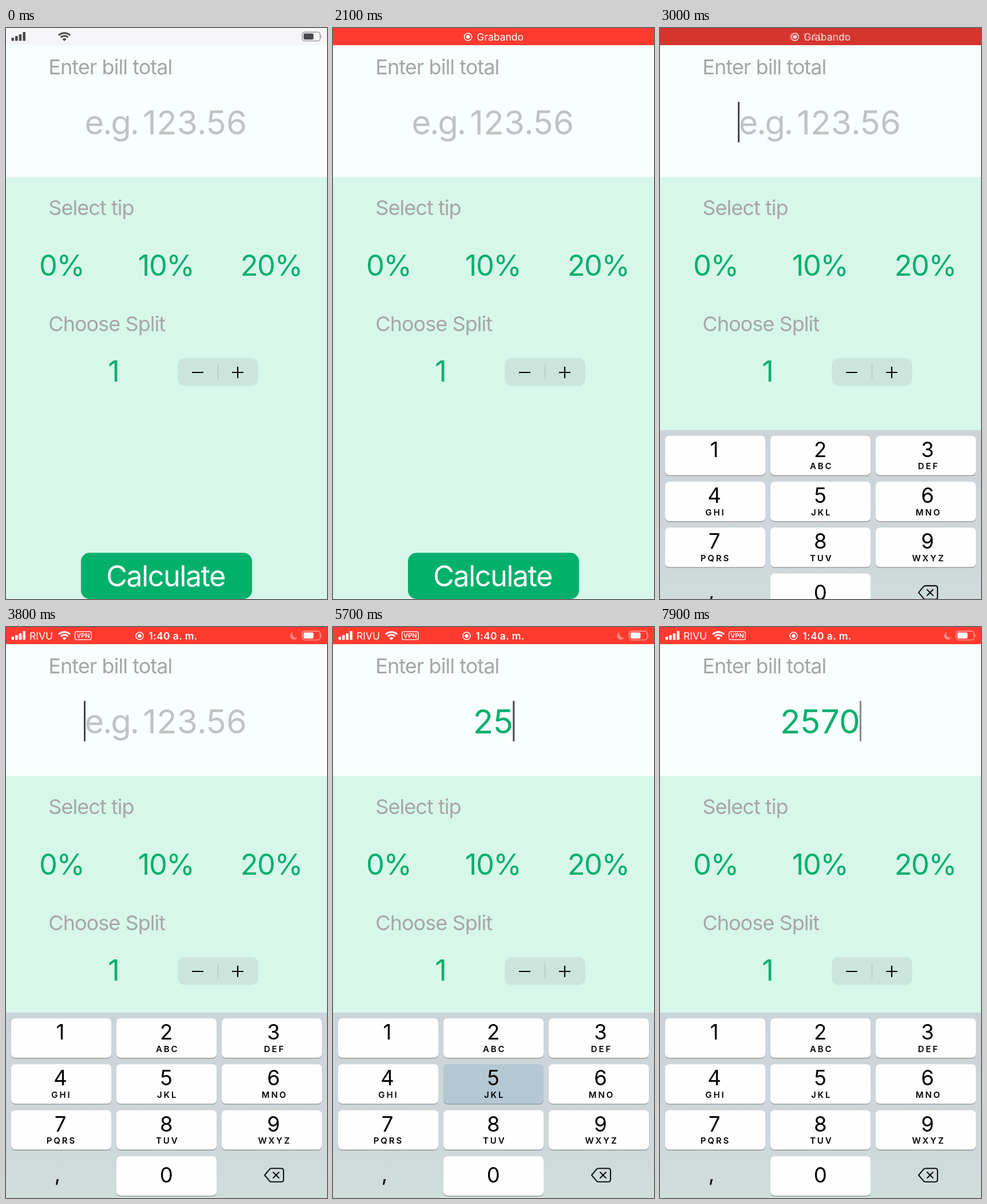
Animation of 561x998 px, one loop 8000 ms. Source, as an HTML page:

```html
<!DOCTYPE html>
<html lang="en">
<head>
<meta charset="utf-8">
<title>Tip calculator</title>
<style>
  html, body { margin: 0; width: 100%; height: 100%; overflow: hidden; }
  svg { display: block; width: 561px; height: 998px; }
  text { font-family: Inter, Roboto, sans-serif; font-optical-sizing: none; }
  .mid, .tip, .key, .sub { text-anchor: middle; }
  .label { font-size: 36px; letter-spacing: -.95px; fill: #a6a6a6; }
  .tip { font-size: 50.5px; letter-spacing: -1.5px; fill: #00b06b; }
  .bill { font-size: 58px; }
  .hint { fill: #c0c2c4; }
  .key { font-size: 36.5px; }
  .sub { font-size: 15px; font-weight: 600; letter-spacing: 2.9px; }
  .bar { font-size: 17.5px; fill: #fff; }
  .badge { font-size: 11px; font-weight: 600; }
</style>
</head>
<body>
<svg viewBox="0 0 561 998">
  <defs>
    <linearGradient id="tray" x2="0" y2="1">
      <stop offset="0" stop-color="#ccd4d9"/>
      <stop offset=".7" stop-color="#ced7da"/>
      <stop offset="1" stop-color="#cfdfdb"/>
    </linearGradient>
    <g id="signals" fill="currentColor">
      <rect x="9.5" y="17" width="4.6" height="5.5" rx="1"/>
      <rect x="16" y="14" width="4.6" height="8.5" rx="1"/>
      <rect x="22.6" y="11" width="4.6" height="11.5" rx="1"/>
      <rect x="29.4" y="7" width="4.6" height="15.5" rx="1"/>
      <path d="M102 23l-3.6-3.6a5.1 5.1 0 0 1 7.2 0z"/>
      <path d="M92 12.8a14.2 14.2 0 0 1 20 0M95.6 16.4a9.1 9.1 0 0 1 12.8 0" fill="none" stroke="currentColor" stroke-width="2.9"/>
      <rect x="517.6" y="7.2" width="31.5" height="15.4" rx="4.6" fill="none" stroke="currentColor" stroke-width="1.4" opacity=".55"/>
      <rect x="520" y="9.6" width="17.5" height="10.6" rx="2.4"/>
      <path d="M550.6 12.4q2.2 2.5 0 5z" opacity=".6"/>
    </g>
    <g id="record">
      <circle r="6.5" fill="none" stroke="#fff" stroke-width="1.5"/>
      <circle r="3.2" fill="#fff"/>
    </g>
  </defs>

  <rect width="561" height="998" fill="#d7f7ea"/>
  <rect width="561" height="260.5" fill="#f9fffe"/>
  <text class="label" x="74.3" y="81">Enter bill total</text>
  <g id="hint" class="bill hint">
    <text x="137.5" y="186" letter-spacing="-2.4">e.g.</text>
    <text x="239.3" y="186" letter-spacing=".4">123.56</text>
  </g>
  <text id="bill" class="bill mid" x="280" y="186" letter-spacing=".4" fill="#00b06b"></text>
  <rect id="caret" y="129" width="3" height="71" rx="1" fill="#48464a"/>

  <text class="label" x="74.3" y="327">Select tip</text>
  <text class="tip" x="97.3" y="433">0%</text>
  <text class="tip" x="279.6" y="433">10%</text>
  <text class="tip" x="463.7" y="433">20%</text>
  <text class="label" x="74.3" y="530">Choose Split</text>
  <text class="tip" x="187.8" y="618">1</text>
  <rect x="300" y="577" width="141" height="48.5" rx="12" fill="#cbe5dc"/>
  <path d="M370.5 588v26" stroke="#b2c9c1" stroke-width="1.5"/>
  <path d="M325 602h20M395 602h20M405 592v20" stroke="#000" stroke-width="2.2"/>
  <rect x="131" y="917.3" width="299" height="80.7" rx="15" fill="#00b06b"/>
  <text class="mid" x="278.9" y="976" font-size="50.5" letter-spacing="-1.6" fill="#fff">Calculate</text>

  <g id="keyboard">
    <rect y="674" width="561" height="324" fill="url(#tray)"/>
    <g id="keys"></g>
    <text class="key" x="90" y="968.5">,</text>
    <path d="M452 958l8.5-10.2q1.4-1.6 3.5-1.6h17q4 0 4 4v15.600q0 4-4 4h-17q-2.1 0-3.5-1.6zM467 953l10 10M477 953l-10 10" fill="none" stroke="#111" stroke-width="2.1" stroke-linejoin="round" stroke-linecap="round"/>
  </g>

  <rect width="561" height="30" fill="#f6f5f7"/>
  <use id="idle" href="#signals" color="#4a4a4c"/>
  <rect id="alert" width="561" height="30"/>
  <g id="recording" class="bar">
    <use href="#record" x="236" y="15.5"/>
    <text class="mid" x="292.2" y="21.5">Grabando</text>
  </g>
  <g id="clock" class="bar">
    <use href="#record" x="233.5" y="15.5"/>
    <text class="mid" x="292" y="21.5" font-weight="600" letter-spacing=".4">1:40 a. m.</text>
  </g>
  <g id="status" class="bar">
    <use href="#signals" color="#fff"/>
    <text x="41" y="21.5">RIVU</text>
    <rect x="120.6" y="8.2" width="28.6" height="14" rx="3" fill="none" stroke="#fff" stroke-width="1.3"/>
    <text class="mid badge" x="135" y="19.2">VPN</text>
    <path d="M501 9a6.7 6.7 0 1 0 8 9.5a6.9 6.9 0 0 1-8-9.5z" opacity=".4"/>
  </g>
</svg>
<script>
const $ = id => document.getElementById(id);
const LOOP = 8000, KEYBOARD_AT = 2780, KEY_HOLD = 130;
const presses = [[5150, '2'], [5640, '5'], [6020, '7'], [6350, '0']];
const letters = ['', 'ABC', 'DEF', 'GHI', 'JKL', 'MNO', 'PQRS', 'TUV', 'WXYZ'];
const textX = [95, 280.2, 467.5];

function addKey(digit, col, row, sub) {
  const x = 9 + col * 184, y = 684 + row * 80.3, tx = textX[col];
  $('keys').innerHTML += `
    <rect x="${x}" y="${y + 1.3}" width="175" height="69" rx="7" fill="#8b9092"/>
    <rect id="key${digit}" x="${x}" y="${y}" width="175" height="69" rx="7" fill="#fefefe"/>
    <text class="key" x="${tx}" y="${y + (digit ? 37 : 46.5)}">${digit}</text>
    <text class="sub" x="${tx + 2}" y="${y + 58.7}">${sub}</text>`;
}
letters.forEach((sub, i) => addKey(i + 1, i % 3, Math.floor(i / 3), sub));
addKey(0, 1, 3, '');

const ramp = (t, from, to) => Math.min(1, Math.max(0, (t - from) / (to - from)));
const fade = (id, value) => $(id).setAttribute('opacity', value);

// The red bar darkens smoothly around two moments.
function dim(t) {
  return [3000, 6900].reduce((sum, at) => {
    const d = Math.min(1, Math.abs(t - at) / 850);
    return sum + (1 + Math.cos(Math.PI * d)) / 2;
  }, 0);
}

function drawStatus(t) {
  const d = dim(t), swap = ramp(t, 2900, 3300), red = ramp(t, 400, 650);
  $('alert').setAttribute('fill', `rgb(${255 - 43 * d},${59 - 6 * d},${48 - 3 * d})`);
  fade('alert', red);
  fade('idle', 1 - red);
  fade('recording', red * (1 - swap));
  fade('clock', swap);
  fade('status', ramp(t, 3050, 3350));
}

function drawBill(t) {
  const done = presses.filter(p => t >= p[0]);
  const typed = done.map(p => p[1]).join('');
  $('bill').textContent = typed;
  fade('hint', typed ? 0 : 1);
  for (const [at, digit] of presses) {
    const held = t >= at && t < at + KEY_HOLD;
    $('key' + digit).setAttribute('fill', held ? '#b3c8d2' : '#fefefe');
  }
  // Blinking restarts with every key.
  const since = t - (done.length ? done[done.length - 1][0] : KEYBOARD_AT);
  const phase = since % 1000;
  const blink = 1 - ramp(phase, 480, 680) + ramp(phase, 850, 1000);
  fade('caret', since < 0 ? 0 : blink);
  $('caret').setAttribute('x', typed ? 279.7 + typed.length * 17.3 : 136);
}

function drawKeyboard(t) {
  const s = Math.max(0, t - KEYBOARD_AT) * 0.0183;
  const drop = 324 * (1 + s) * Math.exp(-s);
  $('keyboard').setAttribute('transform', `translate(0 ${drop})`);
}

const start = performance.now();
function frame() {
  const t = (performance.now() - start) % LOOP;
  drawStatus(t);
  drawBill(t);
  drawKeyboard(t);
  requestAnimationFrame(frame);
}
frame();
</script>
</body>
</html>
```
